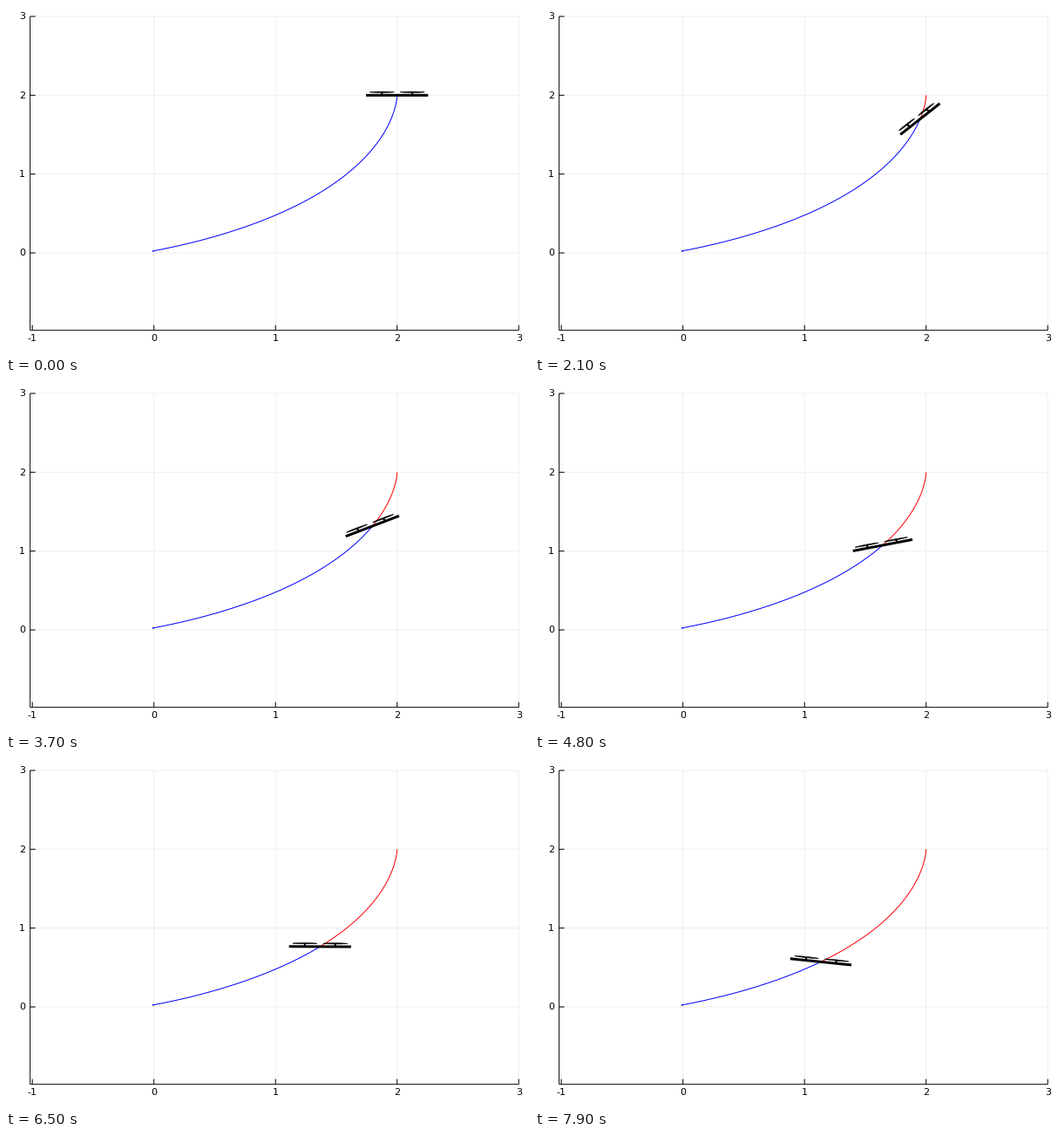
A matplotlib script for the animation above (8 s loop, 600 px wide and 400 px high).

```python
import numpy as np
import matplotlib.pyplot as plt
from matplotlib.animation import FuncAnimation

W, H, DPI = 600, 400, 100
X0, Y0 = 169.7, 283.0        # pixel position of the data origin
SX, SY = 139.5, 90.35        # pixels per data unit
LEFT, RIGHT, TOP, BOTTOM = 27.7, 588.2, 12.0, 371.7
TICK = 6
FRAMES, INTERVAL = 80, 100
PX = 72 / DPI                # one pixel in points
T_END = 300                  # steps until the craft has settled


def position(t):
    """Damped return from (2, 2): three equal poles in x, two real poles in y."""
    t = np.asarray(t, float)
    u = 0.0307 * t
    x = -0.02 + 2.02 * (1 + u + u * u / 2) * np.exp(-u)
    p, q = 0.023, 0.054
    y = 0.02 + 1.98 * (q * np.exp(-p * t) - p * np.exp(-q * t)) / (q - p)
    return x, y


def tilt(t):
    """Quick lean into the move, then a damped swing back past level."""
    swing = np.exp(-0.0155 * t) * np.cos(np.pi / 2 * t / 63.5)
    return np.radians(86 * (1 - np.exp(-0.12 * t)) * swing)


def to_x(px):
    return (px - X0) / SX


def to_y(py):
    return (Y0 - py) / SY


fig = plt.figure(figsize=(W / DPI, H / DPI), dpi=DPI, facecolor="white")
ax = fig.add_axes([0, 0, 1, 1])
ax.set_xlim(to_x(0), to_x(W))
ax.set_ylim(to_y(H), to_y(0))
ax.axis("off")


def line(xs, ys, color="black", width=1.0, z=2):
    return ax.plot(xs, ys, color=color, lw=width * PX, zorder=z,
                   solid_capstyle="butt", snap=False)[0]


def label(x, y, value, ha):
    ax.text(x, y, str(value), fontsize=8, family="DejaVu Sans",
            ha=ha, va="center_baseline")


left, right, top, bottom = to_x(LEFT), to_x(RIGHT), to_y(TOP), to_y(BOTTOM)

for v in range(-1, 4):
    line([v, v], [bottom, top], "#efefef", z=1)
    line([v, v], [bottom, to_y(BOTTOM - TICK)])
    label(v, to_y(380.5), v, "center")
for v in range(4):
    line([left, right], [v, v], "#efefef", z=1)
    line([left, to_x(LEFT + TICK)], [v, v])
    label(to_x(22.3), v + 0.5 / SY, v, "right")
line([left, left], [bottom, top])
line([left, right], [bottom, bottom])

plan = line([], [], "blue", z=3)
trail = line([], [], "red", z=4)

# body-frame parts of the craft
ARM = np.array([(-0.255, 0), (0.255, 0)])
MAST = np.array([(0, 0), (0, 0.04)])
ang = np.linspace(0, 2 * np.pi, 41)
BLADE = np.column_stack([0.1 * np.cos(ang), 0.04 + 0.007 * np.sin(ang)])

arm = line([], [], width=3.0, z=6)
rotors = []
for side in (-0.125, 0.125):
    mast = line([], [], width=2.0, z=6)
    blade = ax.fill([0], [0], fc="black", ec="black", lw=0.5 * PX, zorder=6)[0]
    rotors.append((side, mast, blade))


def place(part, x, y, a):
    c, s = np.cos(a), np.sin(a)
    return part @ np.array([[c, s], [-s, c]]) + (x, y)


def draw(frame):
    t = max(frame - 1, 0)
    x, y = position(t)
    a = tilt(t)
    trail.set_data(*position(np.linspace(0, t, 4 * t + 1)))
    ahead_x, ahead_y = position(np.linspace(t, T_END, 600))
    plan.set_data(np.append(ahead_x, 0), np.append(ahead_y, 0.02))
    arm.set_data(*place(ARM, x, y, a).T)
    for side, mast, blade in rotors:
        mast.set_data(*place(MAST + (side, 0), x, y, a).T)
        blade.set_xy(place(BLADE + (side, 0), x, y, a))
    return []


def reset():
    return draw(0)


anim = FuncAnimation(fig, draw, frames=FRAMES, init_func=reset,
                     interval=INTERVAL, repeat=True, repeat_delay=0)
plt.show()
```
